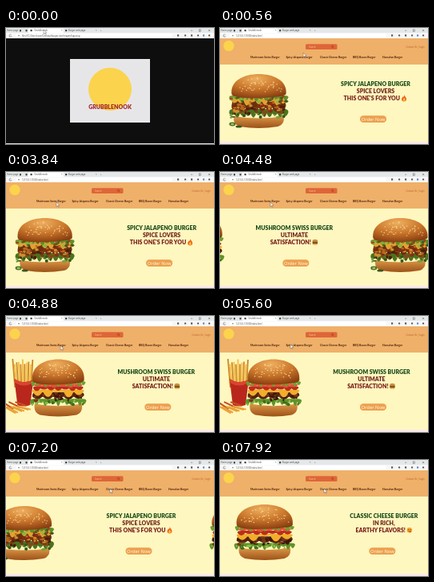
Animation of 260x146 px, one loop 8000 ms. Source, as an HTML page:

```html
<!DOCTYPE html>
<html lang="en">
<head>
<meta charset="utf-8">
<title>Burger menu</title>
<style>
  html, body { margin: 0; width: 100%; height: 100%; overflow: hidden; background: #fff; }
  svg { display: block; width: 260px; height: 146px; }
  text { font-family: "Open Sans", Arial, sans-serif; }
  .title { font: 900 7px Lato, sans-serif; text-anchor: middle; }
  .nav { font: 700 3.4px Lato, sans-serif; fill: #4a210e; }
  .tiny { font-size: 2.7px; fill: #444; }
</style>
</head>
<body>
<svg id="stage" viewBox="0 0 260 146" xmlns="http://www.w3.org/2000/svg">
  <defs>
    <radialGradient id="bun" cx=".45" cy=".2" r=".85">
      <stop offset="0" stop-color="#efb05f"/>
      <stop offset=".5" stop-color="#cb772b"/>
      <stop offset="1" stop-color="#84390e"/>
    </radialGradient>
    <linearGradient id="base" x2="0" y2="1">
      <stop offset="0" stop-color="#dc9848"/>
      <stop offset="1" stop-color="#9c5118"/>
    </linearGradient>
    <clipPath id="view"><rect y="46" width="260" height="97"/></clipPath>
  </defs>
  <g id="picture"></g>
  <g id="page"></g>
  <g id="chrome"></g>
  <path id="cursor" d="M0 0V5.4L1.3 4.3L2.2 6.2L3 5.8L2.2 4H3.8Z" fill="#fff" stroke="#333" stroke-width=".35"/>
</svg>
<script>
const LOOP = 8000, PITCH = 273.5, SLIDE_MS = 1120, SWITCH = 160;
const $ = id => document.getElementById(id);

const rect = (x, y, w, h, fill, r = 0) =>
  `<rect x="${x}" y="${y}" width="${w}" height="${h}" rx="${r}" fill="${fill}"/>`;
const dot = (x, y, rx, fill, ry = rx) =>
  `<ellipse cx="${x}" cy="${y}" rx="${rx}" ry="${ry}" fill="${fill}"/>`;
const shape = (d, fill) => `<path d="${d}" fill="${fill}"/>`;
const line = (d, color, w = .5) =>
  `<path d="${d}" fill="none" stroke="${color}" stroke-width="${w}"/>`;
const label = (x, y, s, cls, extra = '') =>
  `<text x="${x}" y="${y}" class="${cls}" ${extra}>${s}</text>`;
const group = (x, y, body, kx = 1, ky = kx) =>
  `<g transform="translate(${x} ${y}) scale(${kx} ${ky})">${body}</g>`;

function random(seed) {
  return () => (seed = (seed * 16807) % 2147483647) / 2147483647;
}

// A band with a ruffled lower edge
function frill(y, h, half, n, amp, fill) {
  const step = 2 * half / n;
  let d = `M${-half} ${y + h * .4}Q${-half} ${y} ${-half + 5} ${y}H${half - 5}Q${half} ${y} ${half} ${y + h * .4}`;
  for (let i = 0; i < n; i++) {
    const x = half - i * step;
    const dip = y + h + amp * (1 + Math.sin(i * 2.3));
    d += `Q${x - step / 2} ${dip} ${x - step} ${y + h * .55}`;
  }
  return shape(d + 'Z', fill);
}

function chunks(seed, n, y, h, half, colors) {
  const rnd = random(seed);
  let out = '';
  for (let i = 0; i < n; i++) {
    const color = colors[i % colors.length];
    out += dot((rnd() * 2 - 1) * half, y + rnd() * h, 1 + rnd() * 2.2, color, .8 + rnd() * 1.3);
  }
  return out;
}

function dome(seed) {
  const rnd = random(seed);
  let seeds = '';
  for (let i = 0; i < 46; i++) {
    const a = rnd() * Math.PI, r = Math.sqrt(rnd());
    seeds += dot(29 * r * Math.cos(a), 21 - 18 * r * Math.sin(a), .8, '#f8dfa6', .55);
  }
  return shape('M-34 24C-36 7 -18 -1 0 -1S36 7 34 24Q33 28 0 29T-34 24Z', 'url(#bun)') + seeds;
}

const bottomBun = shape('M-31 52Q0 57 31 52Q33 62 24 65Q0 69 -24 65Q-33 62 -31 52Z', 'url(#base)');

function spicyBurger() {
  return bottomBun +
    frill(43, 10, 37, 11, 3, '#4a731f') +
    chunks(53, 16, 47, 7, 35, ['#7aa33a', '#34551a']) +
    frill(33, 15, 34, 8, 2, '#6b2f0e') +
    chunks(77, 80, 33, 16, 32, ['#8b4518', '#b5661f', '#48200b', '#d3902f', '#8e2c14']) +
    frill(30, 5, 34, 9, 5, '#e0a231') +
    frill(26, 6, 37, 12, 3, '#628d2b') +
    chunks(19, 26, 27, 7, 35, ['#88b53f', '#3a601a', '#a93a1b']) +
    dome(31) +
    dot(-33, 62, 4, '#466f20', 2.4) + dot(-33, 62, 2.2, '#a9bd58', 1.2) +
    dot(-25, 65, 4, '#37591c', 1.6);
}

function stackedBurger(seed) {
  return bottomBun +
    frill(46, 6, 37, 13, 4, '#5f9428') +
    chunks(seed + 3, 14, 48, 5, 34, ['#8fbd45', '#3d6b1c']) +
    frill(38, 10, 34, 5, 1, '#54230e') +
    chunks(seed, 30, 39, 9, 31, ['#7a3818', '#3b1609']) +
    frill(35, 4, 34, 5, 7, '#f1ad2b') +
    frill(31, 5, 33, 7, 2, '#bd2c1c') +
    frill(28, 4, 32, 6, 2, '#dc5533') +
    frill(25, 4, 36, 13, 4, '#6da032') +
    dome(seed + 8);
}

// An upright cup with loose fries lying in front
function friesCup() {
  let back = '', front = '';
  for (let i = 0; i < 11; i++) {
    const x = 13 + i * 2, top = 54 + 7 * Math.abs(Math.sin(i * 1.9));
    back += line(`M${x + (i - 6) * .5} ${top}L${x} 90`, i % 2 ? '#f3bd40' : '#cf8525', 1.8);
  }
  for (let i = 0; i < 9; i++) {
    const x = i * 2.7 - 3, y = 108 + 7 * Math.abs(Math.sin(i * 2.1));
    front += line(`M${x} ${y}L${x + 14} ${y + 9 - i * .7}`, i % 3 ? '#e9a136' : '#c6501f', 2);
  }
  return back +
    shape('M12 79Q24 87 36 80L32 112Q23 115 16 112Z', '#b9271c') +
    shape('M12 79Q24 87 36 80L35.5 84Q24 91 12.6 84Z', '#d9452f') + front;
}

const emoji = {
  burger: dot(0, -1.3, 3.3, '#d98a38', 2.2) + rect(-3.4, -.8, 6.8, 1.3, '#5e9231', .5) +
    rect(-3.2, .3, 6.4, 1.4, '#6b2e15', .5) + rect(-3.1, 1.5, 6.2, 1.7, '#dc9440', .8),
  fire: shape('M0 -4C1 -2 3 -1 3 1.5C3 5 -3 5 -3 1.5C-3 0 -2 -.6 -1.6 -1.8C-.6 -1 .3 -2 0 -4Z', '#f0661f') +
    shape('M.2 -.4C2.2 1.4 1.5 3.5 0 3.5S-1.8 1.6 .2 -.4Z', '#fdc63b'),
  yum: dot(0, 0, 3.3, '#f5a52c') + dot(-1.2, -.8, .5, '#4d2611') + dot(1.2, -.8, .5, '#4d2611') +
    line('M-1.6 .8Q0 2.6 1.6 .8', '#4d2611', .5) + dot(1, 2, .9, '#dc4436')
};

function slide(index, art, center, lines, icon, iconX) {
  const lineX = [center, center, iconX - 5];
  const words = lines.map((s, i) => label(lineX[i], 73 + i * 8.9, s, 'title',
    `fill="${['#174717', '#6e2019', '#781c14'][i]}"` + (i === 2 ? ' style="text-anchor:end"' : ''))).join('');
  const button = rect(175, 110.3, 33, 8.8, '#eda04f', 4.2) +
    label(191.5, 116.9, 'Order Now', '', 'font-size="5.8" fill="#fffbe6" text-anchor="middle"');
  return group(index * PITCH, 0, art + words + group(iconX, 88.3, emoji[icon]) + button);
}

$('picture').innerHTML = rect(0, 13, 260, 133, '#0e0e0e') + rect(80, 39, 100, 80, '#e6e6e8') +
  dot(130, 77, 27, '#fbd34d') +
  label(130, 102, 'GRUBBLENOOK', 'title', 'fill="#a3222b"') + rect(0, 145, 260, 1, '#d8d8d8');

const menu = [[38, 'Mushroom Swiss Burger'], [82.5, 'Spicy Jalapeno Burger'],
  [125, 'Classic Cheese Burger'], [166, 'BBQ Bacon Burger'], [203, 'Hawaiian Burger']];

$('page').innerHTML = rect(0, 13, 260, 33, '#efb069') + rect(0, 46, 260, 97, '#fef7bf') +
  rect(0, 143, 260, 3, '#f9eaea') +
  dot(11, 22.5, 6.7, '#fbd34d') +
  rect(107, 20.3, 39.5, 6.6, '#df6538', 1.5) +
  label(111, 24.8, 'Search', 'tiny', 'style="fill:#fbd4a0"') +
  '<circle cx="140.5" cy="23.3" r="1.1" fill="none" stroke="#74260f" stroke-width=".4"/>' +
  line('M141.3 24.1L142.3 25.1', '#74260f', .4) +
  label(232.5, 24.9, 'Contact Us | Login', 'tiny', 'style="fill:#b95a2a"') +
  menu.map(([x, s]) => label(x, 38.3, s, 'nav')).join('') +
  '<g clip-path="url(#view)"><g id="track">' +
  slide(0, friesCup() + group(67, 55.5, stackedBurger(42), .95, 1.06), 189.5,
    ['MUSHROOM SWISS BURGER', 'ULTIMATE', 'SATISFACTION!'], 'burger', 215.5) +
  slide(1, group(48.5, 59, spicyBurger()), 194.5,
    ['SPICY JALAPENO BURGER', 'SPICE LOVERS', 'THIS ONE\'S FOR YOU'], 'fire', 230) +
  slide(2, group(44.5, 57, stackedBurger(91), 1.03), 193.5,
    ['CLASSIC CHEESE BURGER', 'IN RICH,', 'EARTHY FLAVORS!'], 'yum', 225.5) +
  '</g></g>';

const toolIcons = [214, 223, 231, 239, 246, 253]
  .map((x, i) => rect(x, 8.2, 2.2, 2.4, i === 4 ? '#5d8fc2' : '#555', i % 2 ? 1 : .4)).join('');

$('chrome').innerHTML = rect(0, 0, 260, 6.5, '#e4e8e8') + rect(0, 6, 260, 7, '#f7f7f7') +
  rect(28, .6, 44, 6, '#fff', 1) + rect(30.5, 2.1, 2.2, 2.2, '#444', .4) +
  label(35.5, 4.2, 'Grubblenook', 'tiny') + label(69, 4.2, '×', 'tiny') +
  rect(74, 2.1, 2.2, 2.2, '#444', .4) + label(78, 4.2, 'Burger web page', 'tiny') +
  label(112, 4.2, '×', 'tiny') + label(118, 4.3, '+', 'tiny') +
  label(1, 4.2, 'Home page', 'tiny') + rect(17, 2, 2, 2.4, '#444', .4) + rect(24.5, 2, 2, 2.4, '#444', .4) +
  line('M231 3.2h2.2M253 2l2.2 2.2M255.2 2l-2.2 2.2', '#333', .4) +
  '<rect x="241.5" y="2" width="2.2" height="2.2" fill="none" stroke="#333" stroke-width=".4"/>' +
  line('M6.5 8.5A1.5 1.5 0 1 0 7 10', '#444', .5) +
  rect(12, 7.2, 196, 4.8, '#fff', 2.2) + dot(16, 9.6, .8, '#777') +
  label(20, 10.6, '', 'tiny', 'id="url"') + toolIcons;

// Cubic Bezier (.42, 0, .58, 1)
function easeInOut(x) {
  if (x <= 0) return 0;
  if (x >= 1) return 1;
  let lo = 0, hi = 1;
  for (let i = 0; i < 24; i++) {
    const s = (lo + hi) / 2, r = 1 - s;
    if (3 * r * r * s * .42 + 3 * r * s * s * .58 + s ** 3 < x) lo = s; else hi = s;
  }
  return lo * lo * (3 - 2 * lo);
}

// time, x, y
const mouse = [[0, 47, 2], [160, 47, 2], [880, 145, 52], [960, 145, 52], [1040, 148, 57],
  [1300, 149, 57], [1640, 212, 66], [1920, 173, 66], [2020, 173, 66], [2160, 120, 64],
  [2340, 119, 59], [2560, 66, 50], [2740, 66, 45], [3200, 63, 38], [4680, 63, 38],
  [5360, 88, 35.5], [5640, 88, 35.5], [6200, 130, 36], [LOOP, 130, 36]];

function pointer(t) {
  const i = mouse.findIndex(k => k[0] > t);
  const [t0, x0, y0] = mouse[i - 1], [t1, x1, y1] = mouse[i];
  const p = (t - t0) / (t1 - t0), e = p * p * (3 - 2 * p);
  return [x0 + (x1 - x0) * e, y0 + (y1 - y0) * e];
}

function draw(t) {
  const open = t >= SWITCH;
  $('picture').style.display = open ? 'none' : '';
  $('page').style.display = open ? '' : 'none';
  $('url').textContent = open ? '127.0.0.1:5500/index.html'
    : 'file:///C:/Users/user/Desktop/burger-site/images/logo.png';
  const go = start => easeInOut((t - start) / SLIDE_MS);
  const at = 1 - go(3823) + go(5589) + go(6961);
  $('track').setAttribute('transform', `translate(${-at * PITCH} 0)`);
  $('cursor').setAttribute('transform', `translate(${pointer(t).join(' ')})`);
}

let begin;
function frame(now) {
  begin ??= now;
  draw((now - begin) % LOOP);
  requestAnimationFrame(frame);
}
draw(0);
requestAnimationFrame(frame);
</script>
</body>
</html>
```
